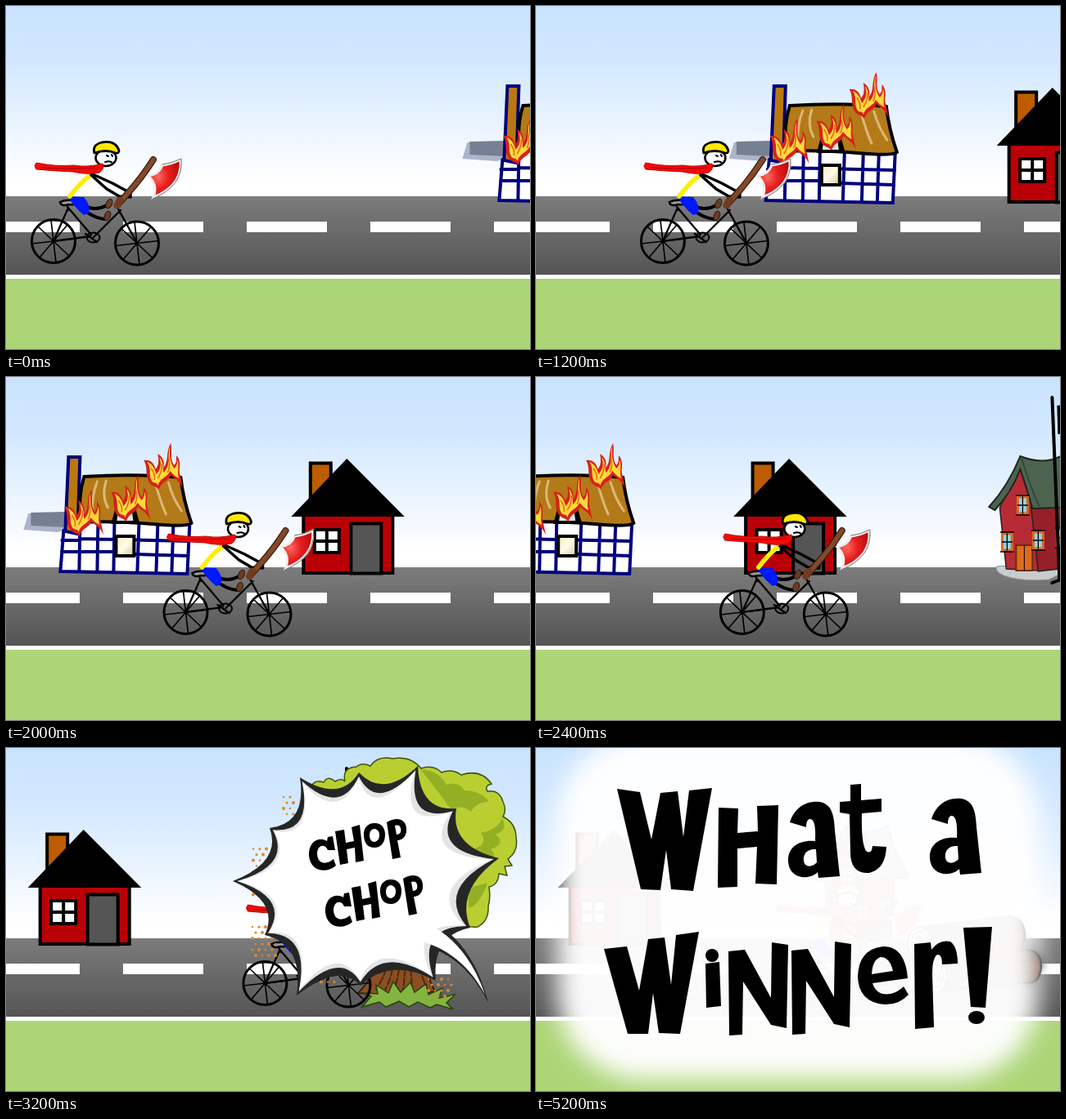
Animation, 640 px wide and 420 px high, one loop 8 s. Source, as an HTML page:

```html
<!DOCTYPE html>
<html lang="en">
<head>
<meta charset="utf-8">
<title>Chop chop</title>
<style>
html, body { margin: 0; width: 100%; height: 100%; overflow: hidden; background: #fff; }
svg { display: block; width: 100vw; height: 100vh; }
.ln { fill: none; stroke: #000; stroke-linecap: round; stroke-linejoin: round; }
</style>
</head>
<body>
<svg viewBox="0 0 640 420">
<defs>
  <linearGradient id="sky" x2="0" y2="1"><stop offset="0" stop-color="#c9e3ff"/><stop offset=".3" stop-color="#d3e8ff"/><stop offset=".92" stop-color="#fff"/></linearGradient>
  <linearGradient id="road" x2="0" y2="1"><stop offset="0" stop-color="#7c7c7c"/><stop offset="1" stop-color="#545454"/></linearGradient>
  <radialGradient id="blade" cx=".3" cy=".45" r=".75"><stop offset="0" stop-color="#ff6a60"/><stop offset=".45" stop-color="#e61e1e"/><stop offset="1" stop-color="#b80808"/></radialGradient>
  <linearGradient id="pane" x2="1" y2="1"><stop offset="0" stop-color="#f2edbd"/><stop offset=".5" stop-color="#fffbe8"/><stop offset="1" stop-color="#cfc9a0"/></linearGradient>
  <linearGradient id="bark" x2="0" y2="1"><stop offset="0" stop-color="#3a1d10"/><stop offset=".4" stop-color="#5b3220"/><stop offset="1" stop-color="#32180c"/></linearGradient>
  <filter id="soft" x="-20%" y="-20%" width="140%" height="140%"><feGaussianBlur stdDeviation="15"/></filter>
  <filter id="shade"><feGaussianBlur stdDeviation="4"/></filter>
  <g id="flame">
    <path fill="#d8201a" d="M8 50C0 40 6 32 0 21C8 20 13 25 14 32C19 27 18 20 17 13C25 18 25 25 24 30C31 22 26 11 33 0C35 11 31 19 37 27C41 23 39 19 40 15C47 24 42 32 44 38L48 56C44 46 38 44 33 39C30 47 22 46 18 57C16 53 11 53 8 50Z"/>
    <path fill="#ffd93b" d="M10 47C5 39 10 32 4 23C12 26 14 34 15 38C22 31 21 24 19 17C25 24 23 31 24 36C34 27 28 14 32 4C31 17 32 23 37 31C40 28 41 25 41 20C44 29 40 35 43 43C38 41 35 37 32 34C29 42 20 42 17 52C16 47 13 50 10 47Z"/>
    <path fill="none" stroke="#e8641c" stroke-width="1.500" d="M9 31Q14 38 13 45M22 25Q23 34 17 43M30 17Q33 28 29 36"/>
  </g>
  <g id="wheel" class="ln">
    <circle r="26.5" stroke-width="3"/>
    <path stroke-width="1.7" d="M-26 3L26 -3M-3 -26L3 26M-19 -18L19 18M-17 20L17 -20"/>
    <circle r="2" fill="#000"/>
  </g>
  <g id="win"><rect x="-6" y="-10" width="12" height="20" fill="#8fd3ea" stroke="#d96a1d" stroke-width="3"/><path class="ln" stroke-width="1.3" d="M0-10V10M-6 0H6M-8-12H8M-8 12H8"/></g>
  <g id="rings"><ellipse rx="14" ry="20" fill="#f7e9b5" stroke="#000" stroke-width="2.5"/><ellipse rx="9.5" ry="14" class="ln" stroke-width="1.8"/><ellipse rx="5" ry="8" class="ln" stroke-width="1.8"/><ellipse rx="1.5" ry="3"/><path class="ln" stroke-width="3" d="M1 2L15 9"/></g>
  <g id="chop" fill-rule="evenodd">
    <path d="M399 108L402 125L393 125C390 117 380 118 380 130C381 143 392 143 400 136L403 144C392 154 372 152 370 132C369 114 383 108 392 114L393 109Z"/>
    <path d="M402 102L413 100L415 116L425 114L422 97L432 94L437 138L427 140L426 122L416 124L418 141L408 143Z"/>
    <path d="M437 108C436 98 442 92 450 92C459 92 463 98 463 106C463 116 458 122 450 122C442 122 438 117 437 108ZM444 107C444 112 447 115 450 115C455 114 456 110 456 106C456 102 453 99 450 99C446 99 444 103 444 107Z"/>
    <path d="M465 91C476 84 488 86 489 98C490 108 484 113 478 113L482 134L472 136ZM475 95L477 106C482 106 483 102 482 98C481 94 478 94 475 95Z"/>
  </g>
  <path id="bigN" d="M235 249L255 247L287 306L288 238L308 241L306 343L287 339L253 286L252 351L236 352Z"/>
  <path id="bigA" fill-rule="evenodd" d="M310 91C316 72 331 64 347 66C361 69 364 81 365 101L371 157L345 159L344 152C333 163 309 160 308 139C307 121 322 112 341 114C342 97 340 86 334 87C331 88 330 92 330 97ZM342 124C331 123 326 130 327 138C328 147 338 146 343 140Z"/>
</defs>

<rect width="640" height="234" fill="url(#sky)"/>
<rect y="233" width="640" height="97" fill="url(#road)"/>
<path stroke="#fff" stroke-width="13" stroke-dasharray="98 53" d="M-8 270.5H640"/>
<rect y="329" width="640" height="5" fill="#fff"/>
<rect y="334" width="640" height="86" fill="#acd577"/>

<g id="cottage">
  <path fill="#abb4cb" d="M349 167L343 187L385 190L398 186V168Z"/>
  <path fill="#777f92" d="M352 166L396 165V184L352 182Z"/>
  <path fill="#fff" stroke="#00007d" stroke-width="4" d="M392 188L388 238L543 241L546 178L412 174Z"/>
  <path class="ln" style="stroke:#00007d" stroke-width="4" d="M390 200H412M390 214H454M412 198L545 201M480 217L544 219M412 178L411 238M434 178L433 239M454 180L453 239M484 180L482 239M507 180L505 240M526 180L524 240"/>
  <path fill="#b9780f" stroke="#00007d" stroke-width="4" d="M398 98L412 98L409 192L394 189Z"/>
  <path fill="#b37a17" stroke="#000" stroke-width="4" d="M417 122Q480 118 535 123Q538 150 548 179Q542 184 500 180Q450 176 413 178Q409 148 417 122Z"/>
  <path class="ln" style="stroke:#d9b878" stroke-width="3" d="M433 128Q426 146 427 169M444 127Q438 145 446 160M504 130Q511 155 517 168M520 129Q525 148 536 164"/>
  <path d="M450 180L456 157L467 150L479 158L485 180Z"/>
  <path fill="#e3e3df" d="M457 176L459 161H475L477 176Z"/>
  <rect x="456" y="195" width="22" height="24" fill="url(#pane)" stroke="#000" stroke-width="4"/>
  <use href="#flame" x="490" y="81"/><use href="#flame" x="393" y="138"/><use href="#flame" x="450" y="120"/>
</g>

<g id="redHouse" stroke="#000" stroke-width="4">
  <rect x="479" y="105.500" width="25" height="50" fill="#bd5c00"/>
  <rect x="470.500" y="168" width="109" height="72" fill="#ba0007"/>
  <path stroke="none" d="M455.500 171L523.500 100L594 171Z"/>
  <rect x="528.500" y="179.500" width="37" height="61" fill="#555"/>
  <rect x="484" y="187" width="30" height="28" fill="#fff"/>
  <path d="M499 187V215M483 201H514"/>
</g>

<g id="manor">
  <path fill="#c9cccd" stroke="#8c9090" d="M348 232C344 246 385 251 412 248L437 236L434 226Z"/>
  <path fill="#b72b35" stroke="#222" stroke-width="1.500" d="M352 160L377 108L396 160L400 237L360 235Z"/>
  <path fill="#952029" stroke="#222" stroke-width="1.500" d="M390 157H438L434 234L399 238Z"/>
  <path fill="#4c6350" stroke="#1b241d" stroke-width="2" d="M377 97Q407 109 430 95Q437 130 455 154L453 159L392 161Q385 136 377 113Q366 142 346 163L339 159Q363 132 377 97Z"/>
  <path class="ln" style="stroke:#33483a" stroke-width="2" d="M379 101Q390 136 400 158"/>
  <rect x="372" y="206" width="20" height="31" fill="#dc6c1b" stroke="#6b2d0c" stroke-width="2"/>
  <path class="ln" stroke-width="1" d="M382 207V236"/>
  <use href="#win" x="380" y="157"/><use href="#win" x="361" y="202"/><use href="#win" x="399" y="200"/><use href="#win" x="428" y="197"/>
</g>

<g id="pole">
  <path class="ln" stroke-width="4" d="M416 25L425 249M416 252L424 249"/>
  <path d="M422 35L456 31V66L423 70Z"/>
</g>

<g id="tree">
  <path fill="#8a4f22" stroke="#3d210c" stroke-width="2" d="M462 180Q466 265 430 300Q480 305 524 298Q505 265 508 180Z"/>
  <path class="ln" style="stroke:#4d2910" stroke-width="2" stroke-dasharray="9 3" d="M470 210Q472 270 452 295M476 210Q478 270 463 296M482 210Q484 270 474 296M487 210Q489 270 485 296M492 210Q494 270 496 296M501 220Q502 270 514 294"/>
  <path fill="#b9cf31" stroke="#3f5212" stroke-width="1.500" d="M373 47Q377 38 388 42Q393 33 402 41Q410 36 414 41Q410 24 428 23Q434 17 445 22Q454 9 472 13Q494 9 507 25Q522 20 532 30Q545 25 556 33Q580 25 593 44Q584 46 588 53Q603 51 607 66Q612 75 607 84Q623 92 623 110Q626 127 613 136L618 144L609 145L612 156L602 154Q601 168 590 170Q592 184 589 194Q590 212 576 219Q563 221 558 212Q546 220 537 205Q510 222 484 207Q450 221 429 204Q398 208 394 186Q367 183 371 160Q352 148 362 126Q350 104 364 90Q355 62 373 47Z"/>
  <path fill="#93b024" d="M506 26Q530 28 538 45Q552 40 560 52Q580 52 590 66Q574 66 568 78Q556 68 544 76Q530 56 506 26ZM606 86Q614 100 598 106Q612 118 592 124Q604 138 582 146Q570 160 562 150Q580 140 570 124Q590 118 580 104Q600 100 606 86ZM588 165Q580 190 566 196Q562 180 570 170Z"/>
  <path fill="#84b440" stroke="#24420c" stroke-width="1.500" d="M435 317L446 304L437 300L454 301L452 290L467 300L473 286L482 299L494 287L499 299L513 289L516 302L533 294L529 306L548 302L538 312L546 320L526 314L518 318L503 311L492 317L480 310L464 317L456 311Z"/>
</g>

<g id="logs">
  <path fill="#000" opacity=".6" filter="url(#shade)" d="M450 250L580 210L622 262L608 290L470 302Z"/>
  <g stroke="#000" stroke-width="2.500" fill="url(#bark)">
    <path d="M466 220L578 206Q596 207 597 229Q596 245 588 248L470 260Z"/>
    <path d="M462 259L600 247Q617 249 617 268Q615 286 604 287L484 298Z"/>
  </g>
  <path class="ln" stroke-width="1" opacity=".55" d="M490 228L580 218M488 243L585 233M510 270L606 260M510 284L604 275M505 236L560 230"/>
  <use href="#rings" x="468" y="239"/><use href="#rings" x="463" y="279"/><use href="#rings" x="488" y="279"/>
</g>

<g id="rider">
  <use href="#wheel" x="58" y="288"/><use href="#wheel" x="160" y="290.500"/>
  <path class="ln" stroke-width="2.300" d="M58 288L76 247L104 280M58 288L103 282M107 283L140 250M134 243L160 290M74 243L77 250M97 279L111 289"/>
  <ellipse cx="106.500" cy="283.500" rx="8" ry="6" class="ln" stroke-width="2"/>
  <path fill="#999" stroke="#000" stroke-width="2.500" d="M66 240Q74 236 89 239Q88 244 77 243Q67 246 66 240Z"/>
  <path class="ln" stroke-width="4" d="M98 246Q112 251 125 243M94 249Q108 260 121 261"/>
  <path fill="#0018ff" d="M75 233L95 234Q104 244 101 254L95 256Q84 247 75 233Z"/>
  <path stroke="#ffee00" stroke-width="5.500" stroke-linecap="round" d="M103 207Q90 217 78 233"/>
  <g fill="#6a3d22" stroke="#2b170b"><ellipse cx="126" cy="242" rx="3.500" ry="6" transform="rotate(25 126 242)"/><ellipse cx="124" cy="257" rx="3.500" ry="6" transform="rotate(20 124 257)"/></g>
  <path class="ln" stroke-width="3.500" d="M104 207L123 224L140 234M106 206L130 217L152 229V234L138 233"/>
  <ellipse cx="122" cy="186" rx="12.500" ry="10" fill="#fff" stroke="#000" stroke-width="2.500"/>
  <path class="ln" stroke-width="2" d="M123 183L125 184M129 182L130 184M121 191Q127 189 130 192"/>
  <path fill="#ffe800" stroke="#000" stroke-width="2.800" stroke-linejoin="round" d="M108 180Q105 170 117 167Q134 164 138 177Q138 181 134 180Q122 175 108 180Z"/>
  <path fill="#f00c0c" stroke="#c90000" d="M37 192Q62 197 82 195Q100 198 118 193Q121 199 114 204Q99 207 82 203Q58 202 37 200L35 196Z"/>
  <path class="ln" style="stroke:#a80000" stroke-width="1" d="M44 198Q80 200 112 198"/>
  <path fill="url(#blade)" stroke="#eee" stroke-width="3" d="M174 208Q187 206 191 195Q202 194 213 188Q216 220 180 234Q186 219 174 208Z"/>
  <path class="ln" style="stroke:#777" stroke-width="1" d="M191 194Q202 193 214 187Q217 221 179 236"/>
  <path class="ln" style="stroke:#3d1d0d" stroke-width="8" d="M180 188Q166 210 149 229L136 244"/>
  <path class="ln" style="stroke:#82492a" stroke-width="5.500" d="M180 188Q166 210 149 229L136 244"/>
  <path class="ln" style="stroke:#713b20" stroke-width="9" d="M139 238L136 244"/>
</g>

<g id="burst" role="img" aria-label="Chop chop">
  <g id="dots" fill="#d9892b"></g>
  <path id="edge" fill="#262626"/>
  <path fill="#262626" d="M490 200Q566 220 589 312Q556 246 490 237Z"/>
  <path id="rim" fill="#e2e4e6"/>
  <path id="face" fill="#fff"/>
  <path fill="#fff" d="M484 203Q558 222 585 302Q552 240 484 232Z"/>
  <use href="#chop"/><use href="#chop" x="20" y="69"/>
</g>

<g id="finale" role="img" aria-label="What a Winner!">
  <rect x="26" y="-16" width="588" height="422" rx="105" fill="#fff" opacity=".97" filter="url(#soft)"/>
  <path d="M99 50L127 54L141 112L152 55L173 53L180 109L187 52L215 49L192 175L165 173L159 125L152 174L128 173Z"/>
  <path d="M83 246L111 243L126 297L137 234L157 232L165 290L171 229L199 225L176 350L150 349L143 300L137 350L112 350Z"/>
  <path d="M223 73L247 74L246 104L271 102L270 71L296 70L294 167L268 166L270 121L246 123L246 170L222 171Z"/>
  <use href="#bigA"/><use href="#bigA" x="173" y="-4"/>
  <path d="M384 45L397 44V64L422 62V78L398 80Q397 116 403 126Q410 131 411 120L428 121Q427 148 407 153Q384 154 384 128L383 81L371 79V66L384 65Z"/>
  <ellipse cx="215" cy="254" rx="8" ry="8"/><path d="M207 264L224 262L226 316L208 318Z"/>
  <use href="#bigN"/><use href="#bigN" x="77" y="-1"/>
  <path fill-rule="evenodd" d="M454 282L411 288Q416 304 433 301Q442 299 449 292L455 302Q443 315 425 314Q394 311 393 280Q394 246 424 243Q451 243 454 282ZM410 277L436 273Q432 256 421 256Q411 259 410 277Z"/>
  <path d="M462 240L482 238L483 247Q492 234 506 237Q515 243 515 264L496 265Q496 252 490 253Q484 257 484 276L486 342L463 344Z"/>
  <path d="M522 220L557 219L549 318L531 317Z"/><ellipse cx="538" cy="330" rx="10" ry="8"/>
</g>
</svg>
<script>
const el = id => document.getElementById(id);
const LOOP = 8000, STEP = 200, STOP = 16, RIDE = 16.15, SCROLL = 53.6;

// Spiky star: arcs between tips, bent towards the middle.
const tips = [[277, 163], [322, 98], [359, 36], [431, 30], [503, 22], [550, 74],
  [602, 135], [567, 220], [525, 285], [433, 291], [355, 303], [316, 229]];
function star(inset, bend, dx = 0) {
  const pull = ([x, y], k) => [x + (445 + dx - x) * k, y + (165 - y) * k];
  const p = tips.map(t => pull(t, inset));
  return 'M' + p[0] + p.map((a, i) => {
    const b = p[(i + 1) % p.length];
    return 'Q' + pull([(a[0] + b[0]) / 2, (a[1] + b[1]) / 2], bend) + ' ' + b;
  }).join('') + 'Z';
}
el('edge').setAttribute('d', star(0, 0.26));
el('rim').setAttribute('d', star(0.035, 0.36, -15));
el('face').setAttribute('d', star(0.05, 0.42, -25));

// Halftone patches: centre, columns, rows.
const patches = [[314, 155, 3, 9], [317, 240, 4, 6], [347, 74, 2, 4], [385, 283, 6, 3], [532, 297, 4, 4]];
let dots = '';
for (const [cx, cy, cols, rows] of patches)
  for (let r = 0; r < rows; r++)
    for (let c = 0; c < cols; c++) {
      const x = cx + (c - cols / 2 + (r % 2) / 2) * 8, y = cy + (r - rows / 2) * 7;
      dots += `<circle cx="${x}" cy="${y}" r="${1.2 + (c + r) % 3 * 0.4}"/>`;
    }
el('dots').innerHTML = dots;

const show = (id, on) => el(id).setAttribute('display', on ? 'inline' : 'none');
const shift = (id, x) => el(id).setAttribute('transform', `translate(${x.toFixed(2)} 0)`);

function draw(t) {
  const s = Math.min(STOP, Math.floor(t / STEP));
  shift('rider', RIDE * s);
  shift('cottage', SCROLL * (4 - s));
  shift('redHouse', SCROLL * (8 - s));
  for (const id of ['manor', 'pole', 'tree']) shift(id, SCROLL * (STOP - s));
  show('pole', t < 4200);
  show('tree', s > 12 && t < 4200);
  show('burst', t >= 3200 && t < 4200);
  show('logs', t >= 4200);
  show('finale', t >= 5200);
}

const start = performance.now();
function tick() {
  draw((performance.now() - start) % LOOP);
  requestAnimationFrame(tick);
}
tick();
</script>
</body>
</html>
```
